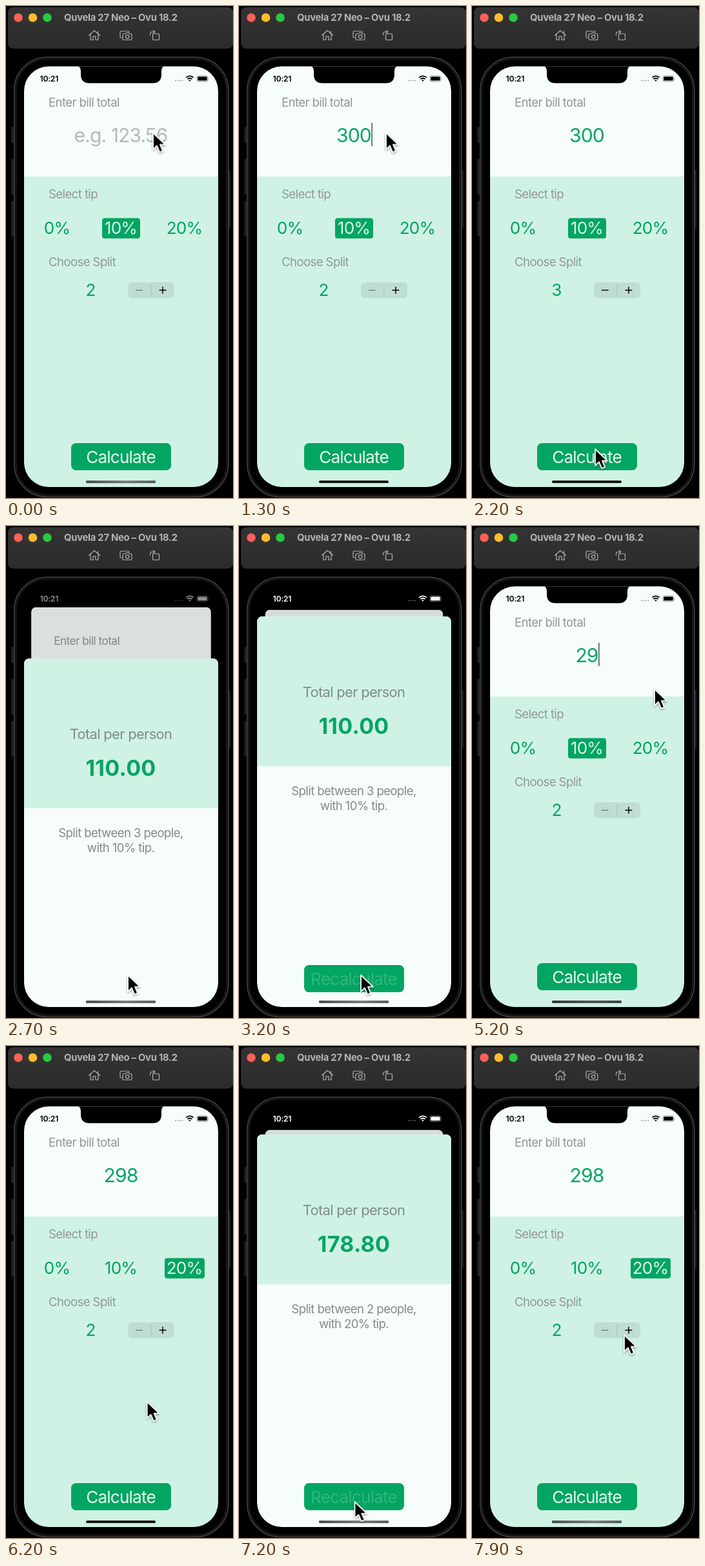
An HTML page that plays this animation: 352x762 px, repeating every 8 s.

```html
<!DOCTYPE html>
<html lang="en">
<head>
<meta charset="utf-8">
<title>Tip calculator</title>
<style>
@property --p { syntax: "<number>"; inherits: true; initial-value: 0; }

html, body { margin: 0; width: 100%; height: 100%; overflow: hidden; background: #000; }
svg { display: block; width: 100vw; height: 100vh; }

/* --p is the sheet's progress: 0 hidden, 1 fully presented */
#stage { animation: present 8s linear infinite; }
@keyframes present {
  0% { --p: 0; }
  31.37% { --p: 0; animation-timing-function: cubic-bezier(.32, .72, 0, 1); }
  38.25%, 40% { --p: 1; animation-timing-function: cubic-bezier(.32, .72, 0, 1); }
  45.5% { --p: 0; }
  80.8% { --p: 0; animation-timing-function: cubic-bezier(.32, .72, 0, 1); }
  87.2%, 91% { --p: 1; animation-timing-function: cubic-bezier(.32, .72, 0, 1); }
  96.2%, 100% { --p: 0; }
}
.form {
  transform-origin: 178.5px 93px;
  transform: translateY(calc(var(--p) * 37px)) scale(calc(1 - var(--p) * .083));
}
.dim { opacity: calc(var(--p) * .13); }
.sheet { transform: translate(28px, calc(745px - var(--p) * 608px)); }
.status {
  --v: calc(255 * var(--p) * var(--p) * var(--p) * var(--p) * var(--p));
  color: rgb(var(--v) var(--v) var(--v));
}

.cursor { animation: roam 8s ease-in-out infinite; }
@keyframes roam {
  0%, 18.1% { transform: translate(228px, 196.5px); }
  21.9%, 23.75% { transform: translate(243px, 441px); }
  28.1%, 41.25% { transform: translate(189px, 695.5px); }
  46.2%, 47.2% { transform: translate(206px, 441px); }
  49.4%, 51% { transform: translate(222px, 200px); }
  53.5%, 65% { transform: translate(283px, 252.5px); }
  67.5% { transform: translate(279px, 346px); }
  70.6% { transform: translate(279px, 346px); animation-timing-function: ease-in; }
  77.5% { transform: translate(219px, 549.5px); animation-timing-function: ease-out; }
  80%, 91.2% { transform: translate(179.5px, 706px); }
  97.5%, 100% { transform: translate(236px, 447.5px); }
}

.glow { animation: glow 8s linear infinite; }
@keyframes glow {
  0%, 9% { opacity: 1; }
  12%, 29% { opacity: 0; }
  32%, 64% { opacity: 1; }
  67%, 80% { opacity: 0; }
  83%, 100% { opacity: 1; }
}

text { font: 400 18.6px Inter, "Liberation Sans", sans-serif; font-optical-sizing: none; letter-spacing: -.032em; }
.mid { text-anchor: middle; }
.green { fill: #03a563; }
.pale { fill: #f6fdfb; }
.mint { fill: #cff2e4; }
.label { fill: #909896; }
.title { font-size: 14.8px; font-weight: 700; letter-spacing: -.018em; fill: #b3b3b3; }
.time { font-size: 12.2px; font-weight: 600; letter-spacing: -.02em; fill: currentColor; }
.bill { font-size: 30.2px; fill: #03a563; }
.bill.empty { fill: #b4bab8; }
.num, .action { font-size: 26.2px; }
.num { fill: #03a563; }
.action { fill: #e8f8f0; }
.pressed { opacity: .2; }
.tip rect { fill: none; }
.tip.on rect { fill: #03a563; }
.tip.on text { fill: #d5f5e8; }
.menu text { font-size: 10.7px; letter-spacing: -.01em; fill: #c8cac9; }
.head { font-size: 22px; fill: #7f8d87; }
.total { font-size: 34px; font-weight: 700; letter-spacing: .008em; }
.note { fill: #838c88; }
</style>
</head>
<body>
<svg id="stage" viewBox="0 0 352 762">
  <defs>
    <linearGradient id="bar" x2="0" y2="1"><stop stop-color="#343434"/><stop offset="1" stop-color="#2b2b2b"/></linearGradient>
    <linearGradient id="gray"><stop stop-color="#4c4f4e"/><stop offset=".6" stop-color="#7b807e"/><stop offset="1" stop-color="#5a5e5c"/></linearGradient>
    <clipPath id="screen"><rect x="28" y="93.500" width="301" height="651.500" rx="38"/></clipPath>
    <clipPath id="card"><rect x="28" y="93" width="301" height="660" rx="8"/></clipPath>
    <clipPath id="page"><rect width="301" height="660" rx="8"/></clipPath>
    <filter id="shadow" x="-50%" y="-50%" width="200%" height="200%">
      <feDropShadow dx="0" dy="1.5" stdDeviation="1.5" flood-opacity=".4"/>
    </filter>
  </defs>

  <!-- window bar -->
  <rect x="3" y="2" width="349" height="64" rx="8" fill="url(#bar)"/>
  <circle cx="19" cy="18" r="6.800" fill="#ff5f57"/>
  <circle cx="41.5" cy="18" r="6.800" fill="#febc2e"/>
  <circle cx="64" cy="18" r="6.800" fill="#28c840"/>
  <text class="title" x="90" y="23">Quvela 27 Neo – Ovu 18.2</text>
  <g fill="none" stroke="#b0b0b0" stroke-width="1.2" stroke-linejoin="round" stroke-linecap="round">
    <path d="M128.5 45.5 137 38l8.500 7.500M131 44v8.500h4v-5.500h4v5.500h4V44M142.500 42.500V39"/>
    <path d="M180 49h-1.500q-1.500 0-1.500-1.500v-7q0-1.500 1.500-1.500h11q1.500 0 1.500 1.500"/>
    <path d="M182.500 43h2.500l1.200-1.500h4l1.200 1.500h2.100q1.500 0 1.500 1.500v6.500q0 1.500-1.500 1.500h-11q-1.500 0-1.500-1.500v-6.500q0-1.500 1.500-1.500z"/>
    <circle cx="188.200" cy="47.600" r="2.700"/>
    <rect x="227.500" y="43" width="10" height="9.500" rx="1.300"/>
    <path d="M223.500 45v-1.500q0-3.500 3.500-3.500h3.500M228.500 37.800l2.300 2.200-2.300 2.200"/>
  </g>

  <!-- phone body -->
  <g fill="#1f1f21">
    <rect x="8" y="187" width="6" height="25" rx="1.500"/>
    <rect x="8" y="237" width="6" height="55" rx="1.500"/>
    <rect x="8" y="302" width="6" height="55" rx="1.500"/>
    <rect x="343" y="254" width="5" height="91" rx="1.500"/>
  </g>
  <rect x="12.800" y="79.300" width="332" height="681" rx="51" fill="#050505" stroke="#464648" stroke-width="1.500"/>
  <rect x="15.500" y="82" width="326.500" height="675.500" rx="48" fill="#000" stroke="#1b1b1d" stroke-width="2"/>

  <g clip-path="url(#screen)">
    <rect x="28" y="93" width="301" height="652"/>
    <g class="form">
      <g clip-path="url(#card)">
        <rect class="pale" x="28" y="93" width="301" height="172"/>
        <rect class="mint" x="28" y="264" width="301" height="490"/>
        <text class="label" x="66" y="156">Enter bill total</text>
        <text class="bill mid" id="bill" x="178" y="210.500"></text>
        <rect id="caret" y="181" width="1.500" height="36" fill="#3f5a50"/>

        <text class="label" x="66" y="298">Select tip</text>
        <g class="tip" data-tip="0"><rect x="56" y="328.500" width="46" height="31.500" rx="4"/><text class="num mid" x="79" y="353">0%</text></g>
        <g class="tip" data-tip="10"><rect x="149" y="328.500" width="59" height="31.500" rx="4"/><text class="num mid" x="178" y="353">10%</text></g>
        <g class="tip" data-tip="20"><rect x="246" y="328.500" width="62" height="31.500" rx="4"/><text class="num mid" x="276.500" y="353">20%</text></g>

        <text class="label" x="66" y="403">Choose Split</text>
        <text class="num mid" id="split" x="131" y="448.500"></text>
        <rect x="189" y="428" width="72" height="24.500" rx="6" fill="#bfded1"/>
        <path d="M224.800 431.500v17.500" stroke="#a9c6ba"/>
        <path id="minus" d="M200.800 440.200h10.800" stroke-width="1.400"/>
        <path d="M237.600 440.200h10.800M243 434.800v10.800" stroke="#000" stroke-width="1.500"/>

        <rect class="green" x="101" y="677" width="155" height="42" rx="7.500"/>
        <text class="action mid" id="calc" x="178" y="707.500">Calculate</text>

        <g class="menu" id="menu">
          <path d="M118 139H294q5 0 5 5v18q0 5-5 5H213.500l-7 7-7-7H118q-5 0-5-5v-18q0-5 5-5z" fill="#393b3a" fill-opacity=".91"/>
          <text class="mid" x="142.500" y="157">Select</text>
          <text class="mid" x="208" y="157">Select All</text>
          <text class="mid" x="271.500" y="157">Paste</text>
        </g>
        <rect class="dim" x="28" y="93" width="301" height="660"/>
      </g>
    </g>

    <path d="M108 92q8 1 8 9v5q0 13.500 13.500 13.500h98q13.500 0 13.500-13.500v-5q0-8 8-9z"/>

    <g class="sheet">
      <g clip-path="url(#page)">
        <rect class="pale" width="301" height="660"/>
        <rect class="mint" width="301" height="232"/>
        <text class="head mid" x="150" y="125">Total per person</text>
        <text class="total green mid" id="total" x="150" y="181.500"></text>
        <text class="note mid" id="people" x="150" y="276.500"></text>
        <text class="note mid" id="rate" x="150" y="299.500"></text>
        <rect class="green" x="73" y="540" width="155" height="42" rx="7.500"/>
        <text class="action mid" id="recalc" x="150" y="570.500">Recalculate</text>
      </g>
    </g>

    <g class="status" fill="currentColor">
      <text class="time" x="52.500" y="117">10:21</text>
      <g opacity=".35">
        <circle cx="263" cy="115.500" r="1.100"/><circle cx="266.500" cy="115.500" r="1.100"/>
        <circle cx="270" cy="115.500" r="1.100"/><circle cx="273.500" cy="115.500" r="1.100"/>
      </g>
      <path d="M279.300 110.800q5.700-4.800 11.400 0M281.500 113.200q3.500-3 7 0" fill="none" stroke="currentColor" stroke-width="1.800"/>
      <path d="M283.300 115q1.700-1.400 3.400 0l-1.700 1.900z"/>
      <rect x="296" y="108.300" width="17" height="8.600" rx="2.500" fill="none" stroke="currentColor" stroke-opacity=".45" stroke-width=".9"/>
      <rect x="297.300" y="109.600" width="14.400" height="6" rx="1.400"/>
      <path d="M314.200 111.200q1.300 1.400 0 2.800z" opacity=".5"/>
    </g>

    <rect x="124" y="735" width="108" height="3.800" rx="1.900"/>
    <rect class="glow" x="124" y="735" width="108" height="3.800" rx="1.900" fill="url(#gray)"/>
  </g>

  <g class="cursor">
    <path d="M0 0V25.500l6-5.500 4.300 10 4.900-2.100-4.300-9.700h8z" fill="#000" stroke="#fff" stroke-width="1.800" stroke-linejoin="round" filter="url(#shadow)"/>
  </g>
</svg>

<script>
const LOOP = 8000;
const PLACEHOLDER = "e.g. 123.56";
const $ = id => document.getElementById(id);
const tips = document.querySelectorAll(".tip");

// each track lists [start in ms, value]
const tracks = {
  bill: [[0, ""], [700, "3"], [900, "30"], [1080, "300"], [4700, "30"], [4800, "3"],
         [4880, ""], [5000, "2"], [5150, "29"], [5300, "298"]],
  editing: [[0, false], [250, true], [1850, false], [3980, true], [5500, false]],
  menu: [[0, false], [4130, true], [4620, false]],
  tip: [[0, 10], [5550, 20]],
  split: [[0, 2], [1850, 3], [3760, 2]],
  result: [[0, ["110.00", 3, 10]], [6000, ["178.80", 2, 20]]],
  calc: [[0, false], [2380, true], [2560, false], [6400, true], [6560, false]],
  recalc: [[0, false], [3120, true], [3380, false], [7150, true], [7420, false]]
};

const at = (name, t) => tracks[name].findLast(([start]) => start <= t)[1];
const show = (el, on) => el.setAttribute("visibility", on ? "visible" : "hidden");
const write = (id, value) => {
  const el = $(id);
  if (el.textContent !== String(value)) el.textContent = value;
};

function render(t) {
  const amount = at("bill", t);
  write("bill", amount || PLACEHOLDER);
  $("bill").classList.toggle("empty", !amount);

  const half = $("bill").getComputedTextLength() / 2;
  $("caret").setAttribute("x", amount ? 178 + half + .5 : 178 - half - 2);
  show($("caret"), at("editing", t) && t % 1000 < 650);
  show($("menu"), at("menu", t));

  const tip = at("tip", t);
  tips.forEach(el => el.classList.toggle("on", Number(el.dataset.tip) === tip));

  const split = at("split", t);
  write("split", split);
  $("minus").setAttribute("stroke", split > 2 ? "#000" : "#6f827a");

  const [total, people, rate] = at("result", t);
  write("total", total);
  write("people", `Split between ${people} people,`);
  write("rate", `with ${rate}% tip.`);

  for (const id of ["calc", "recalc"]) $(id).classList.toggle("pressed", at(id, t));
}

let start;
function tick(now) {
  start ??= now;
  render((now - start) % LOOP);
  requestAnimationFrame(tick);
}
render(0);
requestAnimationFrame(tick);
</script>
</body>
</html>
```
